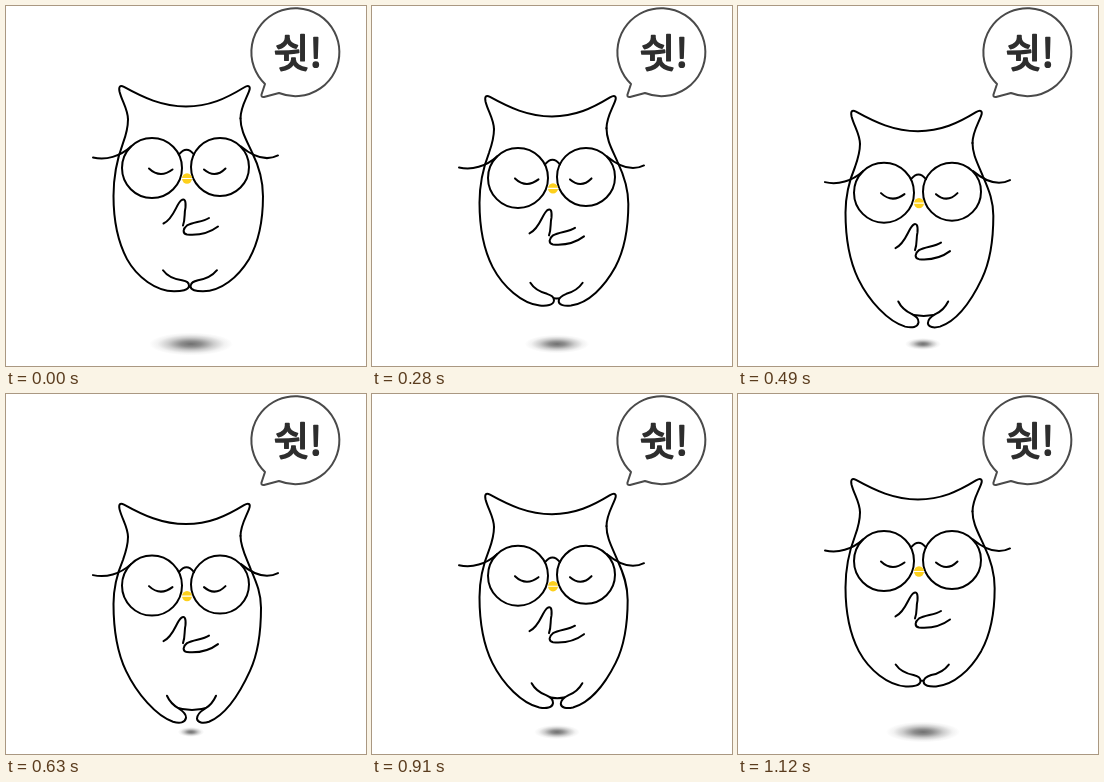
An HTML page for the animation above (1.26 s loop, 360 by 360 pixels).

```html
<!DOCTYPE html>
<html lang="ko">
<head>
<meta charset="utf-8">
<title>Hovering owl</title>
<style>
  html, body { margin: 0; width: 100%; height: 100%; overflow: hidden; background: #fff; }
  svg { display: block; width: 100vw; height: 100vh; }
  .line { fill: none; stroke: #000; stroke-width: 2; stroke-linecap: round; stroke-linejoin: round; }
  .bubble { fill: #fff; stroke: #4a4a4a; stroke-width: 2; stroke-linejoin: round; }
  text {
    font: 400 39px "Noto Sans CJK KR", "Noto Sans CJK", sans-serif;
    fill: #2e2e2e; stroke: #2e2e2e; stroke-width: 1.7; stroke-linejoin: round;
  }
</style>
</head>
<body>
<svg viewBox="0 0 360 360">
  <defs>
    <radialGradient id="shade">
      <stop offset="0" stop-color="#707070"/>
      <stop offset=".25" stop-color="#8e8e8e"/>
      <stop offset=".55" stop-color="#cdcdcd"/>
      <stop offset=".8" stop-color="#f2f2f2"/>
      <stop offset="1" stop-color="#fff"/>
    </radialGradient>
  </defs>

  <path class="bubble" d="M259 78 A44 44 0 1 1 273 87 L258 91 Q255 91.500 255.500 88.500 Z"/>
  <text x="267.500" y="61">쉿!</text>

  <ellipse id="shadow" cx="185" cy="338" fill="url(#shade)"/>

  <g class="line">
    <path id="belly"/>
    <path id="left" fill="#fff"/>
    <path id="right" fill="#fff"/>
  </g>

  <g id="upper" class="line">
    <path d="M122 113 C122 103 116 95 113.500 85 C112.500 80 114 78.500 118 80.500
             C137 91 156 100 180 100 C203 100 220 92 238 81
             C243 78 245 80 243 85 C240 93 234.500 101 234.500 112"/>
    <circle cx="146" cy="161.500" r="30"/>
    <circle cx="214" cy="160.500" r="29"/>
    <path d="M173 148 Q180.500 138.500 188 148"/>
    <path d="M87 151 C100 154 114 150 125 140"/>
    <path d="M235 140 C247 150 260 155 272 149"/>
    <path d="M143 162 Q154 172.500 166.500 163"/>
    <path d="M198 163 Q209 172.500 219.500 162"/>
    <g stroke="none">
      <ellipse cx="181" cy="172" rx="5" ry="5.200" fill="#fdd01c"/>
      <path d="M176 172 H186" stroke="#fff" stroke-width="1.100"/>
    </g>
    <path d="M157.500 217 C168 212 170 198 175 194 C179 191 180 195 179.500 201 C178 207 179.500 212 177 219"/>
    <path d="M203 211.500 C197 215.500 187 215.500 181 219 C177 222 176 227 181 228 C192 229 204 226 212 220"/>
  </g>
</svg>
<script>
const LOOP = 1260, STEP = 70, DROP = 30;
const el = id => document.getElementById(id);

// Each stretching line is given at the top and at the bottom of the float.
const stretch = {
  left: [
    "M122 113 C122 121 121 126 117 137 C111 153 107.500 170 107.500 190 C107.500 213 112 236 121 253 C131 271 150 285 168 285 C175 285 183 284 183 279.500 C183 276 181 275 176 274 C169 273 162 271 157 264",
    "M122 143 C122 150 121 155 117 166 C111 180 107.500 192 107.500 210 C107.500 235 111 258 120 277 C131 300 150 322 167 328 C174 330 179 329 180 324 C180 320 178 318 173 315 C168 312 164 309 161 302"
  ],
  right: [
    "M234.500 112 C234.500 124 240 133 246 146 C253 160 257 174 257 190 C257 215 252 237 243 253 C232 271 215 285 197 285 C190 285 184.500 284 184.500 280 C184.500 276 188 275 192 274 C199 273 206 270 211 264",
    "M234.500 142 C234.500 154 240 163 245 176 C251 190 255 200 255 214 C255 239 252 260 244 277 C234 299 220 321 203 328 C197 330 191.500 329 191 325 C191 321 194 318 199 315 C204 312 207 309 210 302"
  ],
  belly: [
    "M167 277 Q184 284 201 277",
    "M169 313.500 Q186 319 203 313.500"
  ]
};

const lerp = (a, b, p) => a + (b - a) * p;

function mixPath([from, to], p) {
  const ends = to.match(/[\d.]+/g);
  let i = 0;
  return from.replace(/[\d.]+/g, n => lerp(+n, +ends[i++], p).toFixed(2));
}

function draw(ms) {
  // The last step of the loop holds the one before it.
  const step = Math.min(Math.floor((ms % LOOP) / STEP), 16);
  const p = (1 - Math.cos((step - 0.45) * Math.PI / 9)) / 2;

  el("upper").setAttribute("transform", `translate(0 ${(0.3 + DROP * p).toFixed(2)})`);
  for (const id in stretch) el(id).setAttribute("d", mixPath(stretch[id], p));
  el("shadow").setAttribute("rx", lerp(42, 13, p));
  el("shadow").setAttribute("ry", lerp(11.5, 5, p));
}

const start = performance.now();
function tick() {
  draw(performance.now() - start);
  requestAnimationFrame(tick);
}
tick();
</script>
</body>
</html>
```
